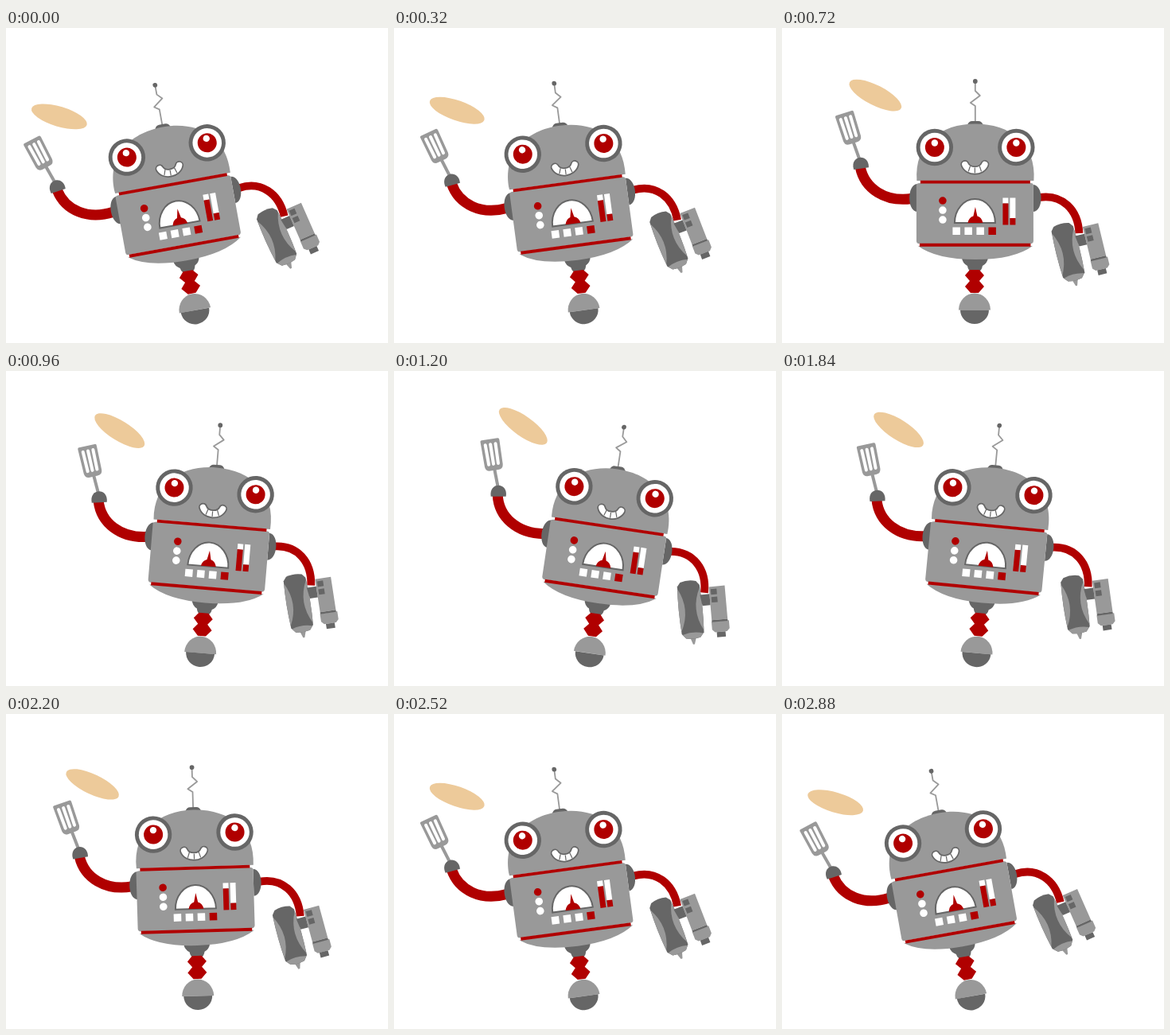
These frames come from a looping animation (480x396 px, 2.92 s). An HTML page:

```html
<!DOCTYPE html>
<html lang="en">
<head>
<meta charset="utf-8">
<title>Swaying robot</title>
<style>
  html, body { margin: 0; width: 100%; height: 100%; overflow: hidden; background: #fff; }
  svg { display: block; width: 480px; height: 396px; }
  .light { fill: #999; }
  .dark { fill: #666; }
  .red { fill: #b00000; }
  .white { fill: #fff; }
  .line { fill: none; stroke-linejoin: round; }
</style>
</head>
<body>
<svg viewBox="0 0 480 396">
  <defs>
    <g id="eye">
      <circle class="dark" r="23.2"/>
      <circle class="white" r="18.3"/>
      <circle class="red" r="12"/>
      <circle class="white" cy="-5.5" r="4.2"/>
    </g>
    <path id="smile" d="M230 171.500C234 181.500 251 181.500 255 171.500"/>
  </defs>
  <g id="robot">
    <ellipse cx="117.5" cy="84.5" rx="36.3" ry="12.6" fill="#edca9a" transform="rotate(27 117.5 84.5)"/>

    <!-- spatula arm -->
    <path class="line" d="M163 214.500C130 219 104 202 98.500 175" stroke="#b00000" stroke-width="13"/>
    <path class="line" d="M89 141L97.500 165" stroke="#999" stroke-width="4"/>
    <g transform="translate(84 125.500) rotate(-17.500)">
      <path class="light" d="M-10-19.500H10Q12.200-19.500 12-17L11.500 14Q11 20 5 20H-5Q-11 20-11.500 14L-12-17Q-12.200-19.500-10-19.500Z"/>
      <path class="line" d="M-6.500-13L-6 12M0-13V12M6.500-13L6 12" stroke="#fff" stroke-width="4" stroke-linecap="round"/>
    </g>
    <path class="dark" d="M-9.500 5C-12.500-13.500 12.500-13.500 9.500 5Z" transform="translate(99 171.500) rotate(-8)"/>

    <!-- tool arm -->
    <path class="line" d="M324 213C352 209 372 228 373.500 258" stroke="#b00000" stroke-width="9.800"/>
    <g transform="translate(359.500 281.500) rotate(-14)">
      <path class="light" d="M-4 35H4L1 44H-1Z"/>
      <path class="dark" d="M-10-35Q0-38 10-35L14-30Q16 0 14 30L9 36Q0 38-9 36L-14 30Q-16 0-14-30Z"/>
      <path class="light" d="M-14-27Q0 0-14 27Q-16 0-14-27ZM14-27Q0 0 14 27Q16 0 14-27ZM-13 31Q0 27 13 31L9 36Q0 38-9 36Z"/>
    </g>
    <g transform="translate(393 270) rotate(-13.500)">
      <path class="light" d="M-10-23H10V19H-10ZM-10.500 21H11.500V31L8 34.500H-7L-10.500 31Z"/>
      <path class="dark" d="M-10 19H10V21.500H-10ZM-5 34.500H6V41H-5ZM-8-20H-.5V-13H-8ZM-8-10H-.5V-3H-8ZM-22-14H-10V0H-20Z"/>
    </g>

    <!-- wheel and spring -->
    <path class="light" d="M222 354.500A20 21 0 0 1 262 354.500Z"/>
    <path class="dark" d="M224 354.500H260A18 17.500 0 0 1 224 354.500ZM226 289H259Q258 296 252 299Q251 305 247 306H238Q234 305 233 299Q227 296 226 289Z"/>
    <path class="red" d="M236 304H248L254 311L248 318L254 325L247 333H237L230 325L236 318L230 311Z"/>

    <!-- antenna -->
    <path class="line" d="M243 68V79L249 85L237 94L243 98V119" stroke="#999" stroke-width="1.800"/>
    <circle class="dark" cx="243" cy="67" r="2.900"/>
    <path class="dark" d="M233 122Q235 117 239 117H247Q251 117 253 122Z"/>

    <!-- head and body -->
    <path class="dark" d="M170 196C157 197 157 230 170 231ZM316 197C329 198 329 230 316 231Z"/>
    <path class="light" d="M169.500 192C166 145 200 120.500 243 120.500S320 145 316.500 192Z"/>
    <path class="light" d="M173 195H313Q316 195 316 198V268Q316 270 314 271H171Q169 270 169 268V198Q169 195 173 195ZM171 274H315Q292 291 243 291T171 274Z"/>
    <path class="red" d="M174 191.700H312V195.500H174ZM173 270.700H312.500V274.700H173Z"/>

    <use href="#eye" x="192" y="150"/>
    <use href="#eye" x="294.500" y="150"/>
    <g class="line" stroke-linecap="round">
      <use href="#smile" stroke="#666" stroke-width="11"/>
      <use href="#smile" stroke="#fff" stroke-width="7.500"/>
      <path d="M236.500 174L234.500 180M242.500 176V182M248.500 174L250.500 180" stroke="#666" stroke-width="1.200"/>
    </g>

    <!-- control panel -->
    <circle class="red" cx="202" cy="217" r="4.800"/>
    <circle class="white" cx="202" cy="229" r="4.800"/>
    <circle class="white" cx="202" cy="241" r="4.800"/>
    <path d="M217 245A25.500 30 0 0 1 268 245Z" fill="#fff" stroke="#666" stroke-width="2"/>
    <path class="red" d="M233.500 245Q235 238 240.500 236.500L243 225L245.500 236.500Q251 238 252.500 245Z"/>
    <path class="white" d="M277.500 213.500H284.500V220.500H277.500ZM286.500 213.500H293.500V239H286.500ZM214.500 250.500H224V260H214.500ZM229.500 250.500H239V260H229.500ZM244.500 250.500H254V260H244.500Z"/>
    <path class="red" d="M277.500 220.500H284.500V247.500H277.500ZM286.500 239H293.500V247.500H286.500ZM259.500 250.500H269V260H259.500Z"/>
  </g>
</svg>
<script>
  const LOOP = 2920, SWAY = 2840, STEP = 40;
  const LEFT = -10.25, RIGHT = 9.75;
  const robot = document.getElementById("robot");
  const start = performance.now();
  const ease = u => u * u * (3 - 2 * u);

  function draw() {
    const t = Math.floor((performance.now() - start) % LOOP / STEP) * STEP;
    const phase = t % SWAY / SWAY;
    const angle = LEFT + (RIGHT - LEFT) * ease(1 - Math.abs(1 - 2 * phase));
    robot.setAttribute("transform", `rotate(${angle} 242 380)`);
    requestAnimationFrame(draw);
  }
  draw();
</script>
</body>
</html>
```
